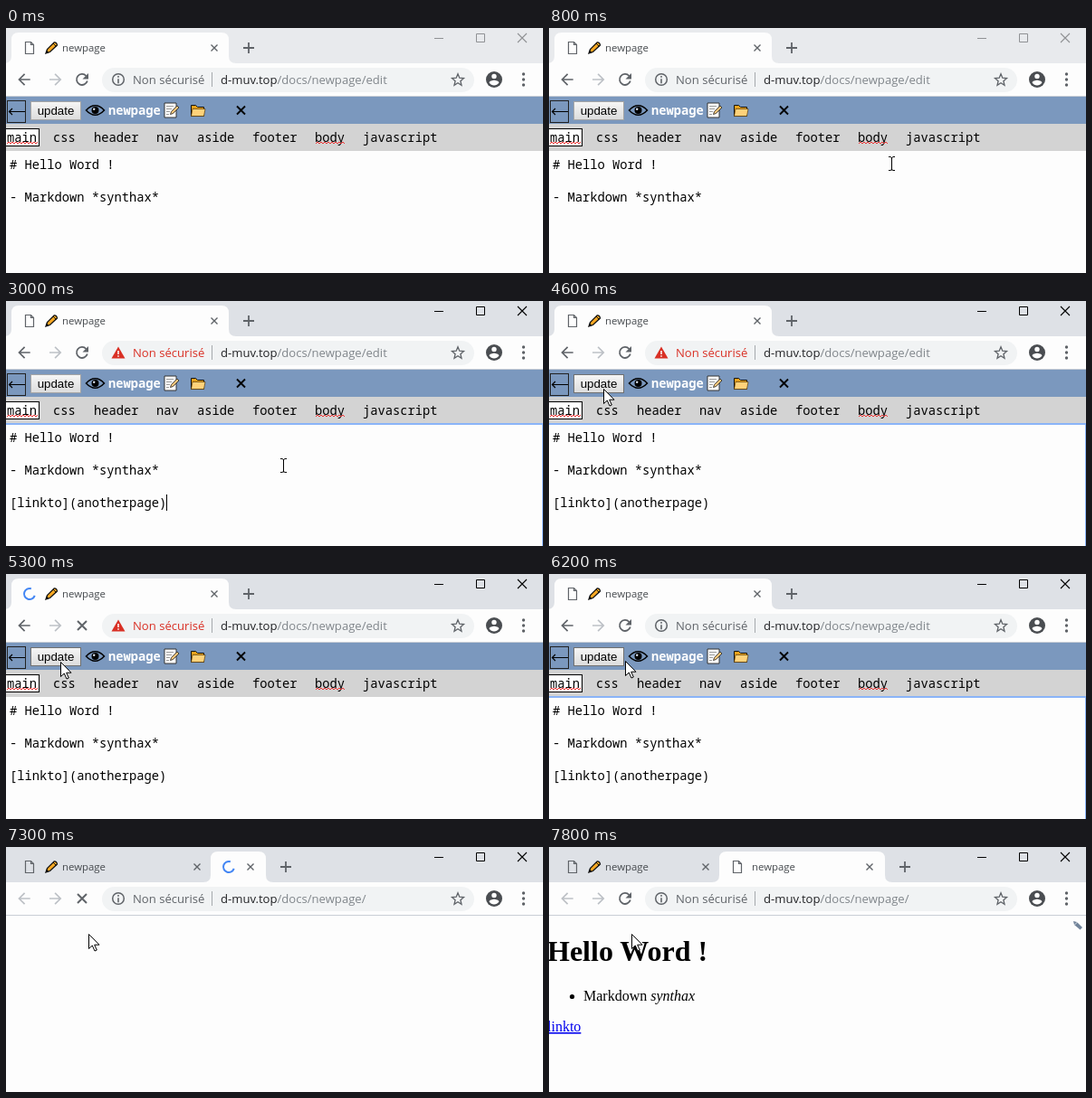
Write an HTML page that moves like this. It is 593 by 271 pixels and loops after 8000 ms.

```html
<!DOCTYPE html>
<html lang="fr">
<head>
<meta charset="utf-8">
<style>
  html, body { margin: 0; width: 100%; height: 100%; overflow: hidden; background: #fdfdfd; }
  svg { display: block; }
  text { white-space: pre; }
  .ui { font: 11.4px "Open Sans", "Noto Sans", sans-serif; fill: #45494d; }
  .url { font: 13.1px "Open Sans", "Noto Sans", sans-serif; fill: #202124; }
  .mono { font: 13.75px "Noto Sans Mono", monospace; }
  .bold { font-weight: 700; fill: #fff; }
  .button { font: 13.3px "Liberation Sans", sans-serif; text-anchor: middle; }
  .serif { font: 16px "Liberation Serif", serif; }
  .title { font: 700 32px "Liberation Serif", serif; }
  .link { fill: #00e; text-decoration: underline; }
</style>
</head>
<body>
<svg id="stage" width="593" height="271" viewBox="0 0 593 271"></svg>
<script>
const LOOP = 8000, STEP = 100;
const GREY = '#5f6368', PALE = '#bdc1c6', RED = '#d93025', PAPER = '#fdfdfd';
const HOST = 'd-muv.top', PATH = '/docs/newpage/';
const stage = document.getElementById('stage');

const rect = (x, y, w, h, fill, more = '') =>
  `<rect x="${x}" y="${y}" width="${w}" height="${h}" fill="${fill}" ${more}/>`;
const disc = (x, y, r, fill, more = '') => `<circle cx="${x}" cy="${y}" r="${r}" fill="${fill}" ${more}/>`;
const shape = (d, fill, more = '') => `<path d="${d}" fill="${fill}" ${more}/>`;
const line = (d, color = GREY, width = 2) => shape(d, 'none', `stroke="${color}" stroke-width="${width}"`);
const text = (x, y, s, cls, more = '') => `<text x="${x}" y="${y}" class="${cls}" ${more}>${s}</text>`;
const move = (x, y, s) => `<g transform="translate(${x} ${y})">${s}</g>`;
const cross = (x, y, r, color, width) =>
  line(`M${x - r} ${y - r}l${2 * r} ${2 * r}m0 ${-2 * r}l${-2 * r} ${2 * r}`, color, width);
const within = (t, a, b) => t >= a && t < b;
const clamp = v => Math.max(0, Math.min(1, v));

// Caret: start, end, x, y
const carets = [
  [1300, 1700, 169, 178], [2100, 2400, 4, 196], [2400, 2900, 4, 214],
  [3000, 3500, 177, 214], [4000, 4500, 177, 214],
  [5400, 5800, 4, 142], [6300, 6800, 4, 142]
];

// Pointer: start, end, from, to
const moves = [
  [300, 1000, [630, 39], [306, 182]],
  [4100, 4600, [306, 182], [60, 97]],
  [5700, 6400, [60, 97], [91, 96]]
];

function pointer(t) {
  const [a, b, from, to] = moves.filter(m => t >= m[0]).pop() || moves[0];
  const p = 1 - (1 - clamp((t - a) / (b - a))) ** 1.2;
  return from.map((v, i) => Math.round(v + (to[i] - v) * p));
}

function drawPointer(x, y) {
  return move(x, y, y > 136
    ? line('M-3 -7.5H-1L.5 -6.5 2 -7.5H4M.5 -7V7.5M-3 7.5H-1L.5 6.5 2 7.5H4', '#000', 1)
    : shape('M.5 .5V16.5L4.3 13 7 19 9.3 18 6.7 12.2H12z', '#fff', 'stroke="#000"'));
}

const pencil = move(43, 15,
  shape('M1 13L2.5 8.5 10 1Q13 .5 13.5 4L5.5 11.5z', '#f7a823', 'stroke="#111" stroke-width="1.3"') +
  shape('M1 13L2 9.5 4.5 12z', '#111') + line('M9 2L12.5 5.5', '#111', 1));

const favicon = x => line(`M${x + 1.5} 15.5h6l3 3v10h-9zM${x + 7.5} 15.5v3h3`, GREY, 1.2);

function spinner(x, t) {
  return `<g transform="rotate(${t * 0.36} ${x + 6} 22)">` +
    line(`M${x + 6} 16a6 6 0 1 1 -6 6`, '#4285f4', 2) + '</g>';
}

const tabShape = (x, w) => shape(
  `M${x - 8} 39q8 0 8-8V13q0-8 8-8H${x + w - 8}q8 0 8 8V31q0 8 8 8z`, PAPER);

function tabs(t) {
  const grow = clamp((t - 7200) / 300);
  const w = 240 - 57 * grow, second = grow > 0;
  const x2 = 6 + w - 1, w2 = 183 * grow, end = second ? x2 + w2 : 246;
  const busy = within(t, 4900, 5700);
  let s = rect(0, 0, 593, 39, t < 1300 ? '#e8eaed' : '#dee1e6');
  s += second ? tabShape(x2, w2) : tabShape(6, w);
  s += (busy ? spinner(20, t) : favicon(20)) + pencil + text(62, 26, 'newpage', 'ui');
  s += cross(6 + w - 16, 22, 3.5, GREY, 1.4);
  if (w2 > 60) {
    const loaded = t >= 7800;
    s += `<clipPath id="label"><rect x="${x2 + 32}" y="8" width="${w2 - 64}" height="28"/></clipPath>`;
    s += loaded ? favicon(x2 + 14) : spinner(x2 + 14, t);
    s += `<g clip-path="url(#label)">${text(x2 + 36, 26, loaded ? 'newpage' : HOST + PATH, 'ui')}</g>`;
    s += cross(end - 17, 22, 3.5, GREY, 1.4);
  }
  s += line(`M${end + 16} 22h12m-6-6v12`, GREY, 1.8);
  const ink = t < 1300 ? '#8f9194' : '#000';
  return s + line('M473 11.5h10', ink, 1) + line('M519.5 6.5h9v9h-9z', ink, 1) + cross(570, 11, 5, ink, 1.1);
}

const avatar = disc(539, 57, 9, '#4a4d51') + disc(539, 53.4, 2.7, '#fff') +
  shape('M533.6 60.6C533.6 58.8 537.2 57.8 539 57.8s5.4 1 5.4 2.8c-2.5 3.8-8.3 3.8-10.8 0z', '#fff');

function addressBar(t) {
  const viewing = t >= 7300, danger = within(t, 2100, 5400);
  const busy = within(t, 4900, 5700) || within(t, 7300, 7800);
  let s = rect(0, 39, 593, 36, PAPER) + rect(0, 75, 593, 1, '#c9ced6');
  s += rect(106, 44, 411, 27, '#f1f3f4', 'rx="13.5"');
  s += line('M26.7 57H14.5M20.6 50.9l-6.1 6.1 6.1 6.1', viewing ? PALE : GREY, 1.7);
  s += line('M48 57H60.2M54.1 50.9l6.1 6.1-6.1 6.1', PALE, 1.7);
  s += busy ? cross(84, 57, 5, GREY, 2)
    : line('M88.5 53A6 6 0 1 0 89.8 58.5', GREY, 1.8) + shape('M91 50v6.5h-6.5z', GREY);
  s += danger
    ? shape('M124 50.5L131.5 63.5H116.5z', RED) + line('M124 55v4m0 1.2v1.6', '#fff', 1.5)
    : disc(124, 57, 6.3, 'none', `stroke="${GREY}" stroke-width="1.5"`) + line('M124 53v1.8m0 1.4v5', GREY, 1.6);
  s += text(140, 62, 'Non sécurisé', 'url', `style="fill:${danger ? RED : GREY}"`);
  s += rect(227, 49, 1, 16, '#a5a9ad');
  s += text(237, 62, `${HOST}<tspan fill="#80868b">${PATH}${viewing ? '' : 'edit'}</tspan>`, 'url');
  s += line('M499 50.8l1.8 4.4 4.7.4-3.6 3.1 1.1 4.6-4-2.5-4 2.5 1.1-4.6-3.6-3.1 4.7-.4z', GREY, 1.3);
  return s + avatar + [51, 57, 63].map(y => disc(571.5, y, 1.7, GREY)).join('');
}

const eye = line('M88.5 91Q98.5 80.5 108.5 91 98.5 101.5 88.5 91z', '#000', 1.5) +
  disc(98.5, 91, 4, '#000') + disc(97.2, 89.8, 1.2, '#dfe6f0');

const memo = move(174, 82,
  shape('M1 1H14V17H1z', '#fff', 'stroke="#333"') +
  line('M3 4.5h8M3 7.5h6M3 10.5h4M3 13.5h3', '#999', 1) +
  shape('M7.5 13.5L8.5 10.5 15 4 17 6 10.5 12.5z', '#f3c27a', 'stroke="#222" stroke-width=".8"'));

const folder = move(203, 83,
  shape('M1.5 14.5V2.5h5l2 2h7v10z', '#e9a11b', 'stroke="#111"') +
  shape('M1.5 14.5L3 6.5H17l-1.5 8z', '#ffd27a', 'stroke="#5a3c08" stroke-width=".7"'));

function squiggle(x, w) {
  let d = `M${x} 128`;
  for (let i = 0; i < w / 2; i++) d += `l2 ${i % 2 ? 2 : -2}`;
  return line(d, '#e33', 1);
}

const menu = [
  [1, 'main'], [52, 'css'], [97, 'header'], [166, 'nav'],
  [211, 'aside'], [272, 'footer'], [341, 'body'], [394, 'javascript']
];

function updateButton(t, [x, y]) {
  const hover = within(x, 27, 85) && within(y, 81, 102);
  const [top, bottom] = within(t, 4700, 5000) ? ['#e2e2e2', '#cfcfcf'] : ['#f6f6f6', '#dcdcdc'];
  return `<linearGradient id="face" x2="0" y2="1"><stop stop-color="${top}"/>` +
    `<stop offset="1" stop-color="${bottom}"/></linearGradient>` +
    rect(27.5, 81.5, 55, 20, 'url(#face)', `stroke="${hover ? '#707070' : '#a5a5a5'}"`) +
    text(55, 96, 'update', 'button');
}

function editor(t, at) {
  const focused = within(t, 1300, 4900) || within(t, 5400, 7100);
  let s = rect(0, 76, 593, 30, '#7b98be') + rect(0, 106, 593, 30, '#d3d3d3');
  s += rect(1.5, 80.5, 20, 24, 'none', 'stroke="#222"') + line('M21 92.5H3.5M7 89l-3.5 3.5L7 96', '#000', 1.2);
  s += updateButton(t, at) + eye + text(113, 96, 'newpage', 'mono bold');
  s += memo + folder + cross(259.5, 91, 4.5, '#000', 1.9);
  s += rect(-0.5, 111.5, 37, 19, '#fff', 'stroke="#000"');
  s += menu.map(([x, label]) => text(x, 126, label, 'mono')).join('');
  s += squiggle(1, 34) + squiggle(342, 32);
  s += text(4, 156, '# Hello Word !', 'mono') + text(4, 192, '- Markdown *synthax*', 'mono');
  if (t >= 3000) s += text(4, 228, '[linkto](anotherpage)', 'mono');
  if (focused) s += line('M0 136H593V271', '#8ab4f8', 2);
  const caret = carets.find(c => within(t, c[0], c[1]));
  if (caret) s += rect(caret[2], caret[3], 1, 18, '#000');
  return s;
}

function page(t) {
  if (t < 7700) return '';
  return text(-2, 126, 'Hello Word !', 'title') + disc(25.5, 165.5, 2.6, '#000') +
    text(38, 170, 'Markdown <tspan font-style="italic">synthax</tspan>', 'serif') +
    text(-2, 204, 'linkto', 'serif link') +
    move(579, 82, shape('M0 0L4 1 10 7 7.5 9.5 1 4z', '#71839a') + line('M1.5 4L4.5 1', '#fff', .8));
}

function draw(t) {
  const at = pointer(t);
  stage.innerHTML = rect(0, 0, 593, 271, PAPER) + tabs(t) + addressBar(t) +
    (t < 7300 ? editor(t, at) : page(t)) + (t >= 400 ? drawPointer(...at) : '');
}

let shown = -1;
const start = performance.now();
function tick() {
  const t = Math.floor((performance.now() - start) % LOOP / STEP) * STEP;
  if (t !== shown) draw(shown = t);
  requestAnimationFrame(tick);
}
tick();
</script>
</body>
</html>
```
